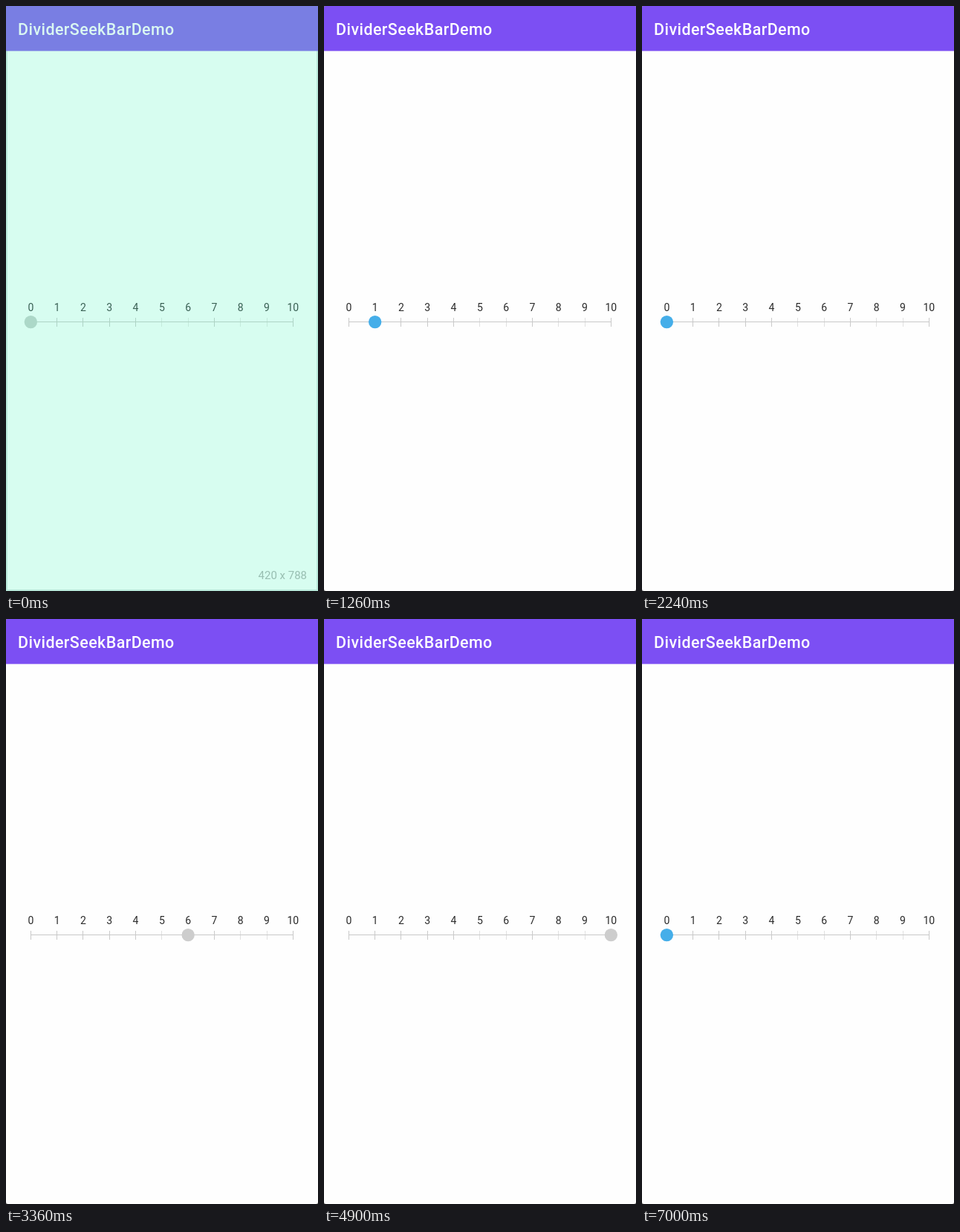
An HTML page that plays this animation: 420x788 px, repeating every 7140 ms.

```html
<!DOCTYPE html>
<html lang="en">
<head>
<meta charset="utf-8">
<title>DividerSeekBarDemo</title>
<style>
  html, body { margin: 0; width: 100%; height: 100%; overflow: hidden; background: #fefefe; }
  svg { display: block; width: 420px; height: 788px; font-family: Roboto, sans-serif; }
  #title { font-size: 21.4px; font-weight: 500; letter-spacing: .45px; }
  #labels { font-size: 14px; text-anchor: middle; }
  #size { font-size: 15px; text-anchor: end; fill: #98beb1; }
</style>
</head>
<body>
<svg viewBox="0 0 420 788">
  <rect id="page" width="420" height="788"/>
  <g id="hint">
    <rect x="1" y="1" width="418" height="786" fill="none" stroke="#9fd8c6" stroke-opacity=".55" stroke-width="2"/>
    <text id="size" x="405" y="772">420 x 788</text>
  </g>
  <rect id="bar" width="420" height="60.6"/>
  <text id="title" x="16.1" y="38.8">DividerSeekBarDemo</text>
  <g id="labels"></g>
  <g id="ticks"></g>
  <path id="track" d="M33 425.5H387"/>
  <circle id="thumb" cy="425.6" r="8.7"/>
  <path id="corners" d="M0 786v2h2zM420 786v2h-2zM0 1.5V0h1.5zM420 1.5V0h-1.5z" fill="#8a8a8a"/>
</svg>
<script>
const LOOP = 7140, STEP = 70, HINT_END = 70, STOPS = 10;
const NS = "http://www.w3.org/2000/svg";
const $ = id => document.getElementById(id);
const stopX = i => 33.35 + 35.3 * i;

// Finger path as [time, value]; the thumb snaps to the nearest stop
const drag = [
  [1180, 0], [1600, 3], [1710, 3], [2340, 0],
  [2730, 0], [3150, 3.6], [3500, 8],
  [4680, 8], [4960, 10], [5040, 10], [5250, 8.4], [5600, 2.4], [5950, 0]
];

function finger(t) {
  const next = drag.findIndex(p => p[0] > t);
  if (next < 1) return 0;
  const [t0, v0] = drag[next - 1], [t1, v1] = drag[next];
  return v0 + (v1 - v0) * (t - t0) / (t1 - t0);
}

const plain = { page: "#fefefe", bar: "#7c4ff3", title: "#fff", text: "#2b2b2b", line: "#c9c9c9", faint: "#e0e0e0", thumb: "#cdcdcd" };
const tinted = { page: "#d7fdf0", bar: "#797ee3", title: "#daf9f2", text: "#3a6054", line: "#aed3c5", faint: "#c3e9db", thumb: "#acd8c8" };

function add(parent, tag, attrs) {
  const el = document.createElementNS(NS, tag);
  for (const k in attrs) el.setAttribute(k, attrs[k]);
  return parent.appendChild(el);
}
const paint = (id, color) => $(id).setAttribute("fill", color);
const show = (id, on) => $(id).setAttribute("visibility", on ? "visible" : "hidden");

const ticks = [];
for (let i = 0; i <= STOPS; i++) {
  add($("labels"), "text", { x: stopX(i), y: 411 }).textContent = i;
  const x = Math.floor(stopX(i)) + .5;
  ticks.push(add($("ticks"), "path", { d: `M${x} 420V432` }));
}
const isFaint = i => i > 4 && i % 3 !== 1;

function draw(ms) {
  const t = Math.floor(ms % LOOP / STEP) * STEP;
  const hint = t < HINT_END;
  const c = hint ? tinted : plain;
  const value = Math.round(finger(t));
  const touched = value > 0 || t > drag[1][0];
  const blue = touched && value <= STOPS / 2;

  paint("page", c.page);
  paint("bar", c.bar);
  paint("title", c.title);
  paint("labels", c.text);
  paint("thumb", blue ? "#45aee9" : c.thumb);
  $("thumb").setAttribute("cx", stopX(value));
  $("track").setAttribute("stroke", c.line);
  ticks.forEach((el, i) => el.setAttribute("stroke", isFaint(i) ? c.faint : c.line));
  show("hint", hint);
  show("corners", !hint);
}

const start = performance.now();
function frame() {
  draw(performance.now() - start);
  requestAnimationFrame(frame);
}
frame();
</script>
</body>
</html>
```
